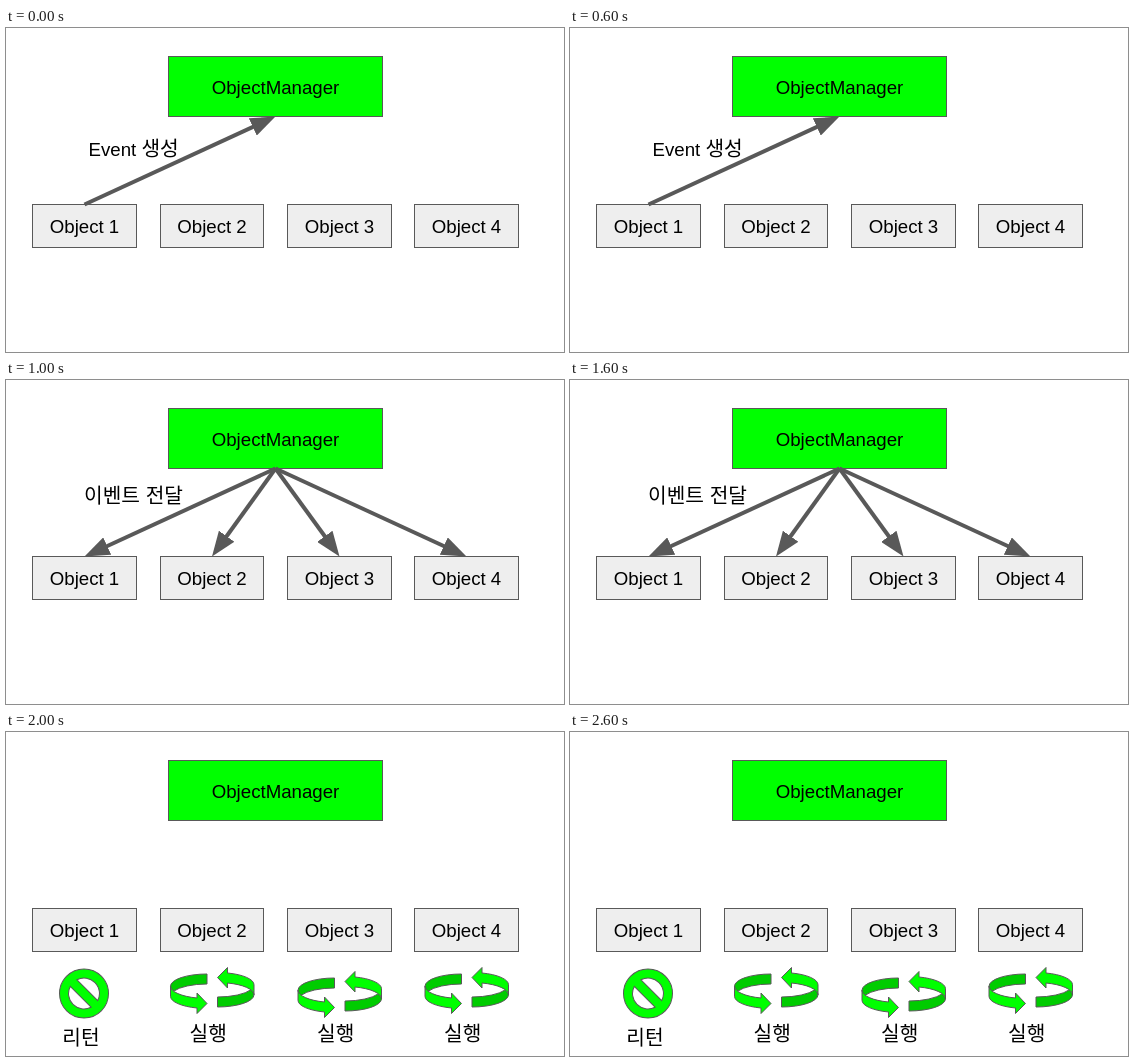
Animation, 558 px wide and 324 px high, one loop 3000 ms. Source, as an HTML page:

```html
<!DOCTYPE html>
<html lang="ko">
<head>
<meta charset="utf-8">
<style>
  html, body { margin: 0; width: 100%; height: 100%; overflow: hidden; background: #fff; }
  svg { display: block; }
  text { font: 18.67px "Liberation Sans", Arial, sans-serif; }
  .ko { font: 300 20.3px "Noto Sans CJK KR", "Noto Sans CJK", sans-serif; }
  .mid { text-anchor: middle; }
  .shape { stroke: #595959; stroke-width: 1; }
  .arrow { stroke: #595959; stroke-width: 4; }
</style>
</head>
<body>
<svg width="558" height="324" viewBox="0 0 558 324">
  <defs>
    <marker id="head" markerUnits="userSpaceOnUse" markerWidth="25" markerHeight="19"
            refX="25" refY="9.5" orient="auto">
      <path d="M0 0L25 9.5L0 19Z" fill="#595959"/>
    </marker>
    <g id="turn" class="shape">
      <path fill="#0c0" d="M-5.25-16.5A36.5 12.25 0 0 0-41.75-4.25A36.5 12.25 0 0 0-38.55 .75A36.5 12.25 0 0 1-5.25-6.5Z"/>
      <path fill="#0f0" d="M-41.75-4.25A36.5 12.25 0 0 0-15.25 7.5V2.5L-5.25 13L-15.25 23V17.5A36.5 12.25 0 0 1-41.75 5.75Z"/>
    </g>
    <g id="cycle">
      <use href="#turn"/>
      <use href="#turn" transform="rotate(180)"/>
    </g>
  </defs>
  <g id="boxes"></g>
  <g class="scene">
    <text x="82.5" y="128">Event <tspan class="ko">생성</tspan></text>
  </g>
  <g class="scene">
    <text class="ko" x="78" y="122.5">이벤트 전달</text>
  </g>
  <g class="scene">
    <g class="shape" transform="translate(78 261.5) rotate(45)">
      <circle r="24.5" fill="#0f0"/>
      <path fill="#fff" d="M-14.7-4.7A15.4 15.4 0 0 1 14.7-4.7ZM-14.7 4.7A15.4 15.4 0 0 0 14.7 4.7Z"/>
    </g>
    <text class="ko mid" x="75" y="313">리턴</text>
  </g>
</svg>
<script>
const SCENE_MS = 1000;
const scenes = [...document.querySelectorAll('.scene')];
const [createScene, sendScene, runScene] = scenes;
const boxes = document.getElementById('boxes');

function add(parent, tag, attrs, text = '') {
  const el = document.createElementNS('http://www.w3.org/2000/svg', tag);
  for (const key in attrs) el.setAttribute(key, attrs[key]);
  el.textContent = text;
  parent.append(el);
}

function box(x, y, width, height, fill, label) {
  add(boxes, 'rect', { x, y, width, height, fill, class: 'shape' });
  add(boxes, 'text', { x: x + width / 2, y: y + height / 2 + 7, class: 'mid' }, label);
}

// The shaft stops inside the head so the tip stays sharp.
function arrow(parent, x1, y1, x2, y2) {
  const k = 1 - 12 / Math.hypot(x2 - x1, y2 - y1);
  add(parent, 'line', { x1, y1, x2: x1 + (x2 - x1) * k, y2: y1 + (y2 - y1) * k, class: 'arrow' });
  add(parent, 'path', { d: `M${x1} ${y1}L${x2} ${y2}`, fill: 'none', 'marker-end': 'url(#head)' });
}

box(162.5, 28.5, 214, 60, '#0f0', 'ObjectManager');
arrow(createScene, 78.5, 176.5, 269.5, 88.5);

[26.5, 154, 281.5, 408.5].forEach((x, i) => {
  box(Math.floor(x) + 0.5, 176.5, i === 1 ? 103 : 104, 43, '#eee', `Object ${i + 1}`);
  arrow(sendScene, 269.5, 88.5, x + 52, 176.5);
  if (!i) return;
  add(runScene, 'use', { href: '#cycle', x: x + 52.25, y: i === 2 ? 262.5 : 258.5 });
  add(runScene, 'text', { x: x + 48.25, y: 308.5, class: 'ko mid' }, '실행');
});

function draw() {
  const current = Math.floor(performance.now() / SCENE_MS) % scenes.length;
  scenes.forEach((scene, i) => scene.style.display = i === current ? '' : 'none');
  requestAnimationFrame(draw);
}
draw();
</script>
</body>
</html>
```
